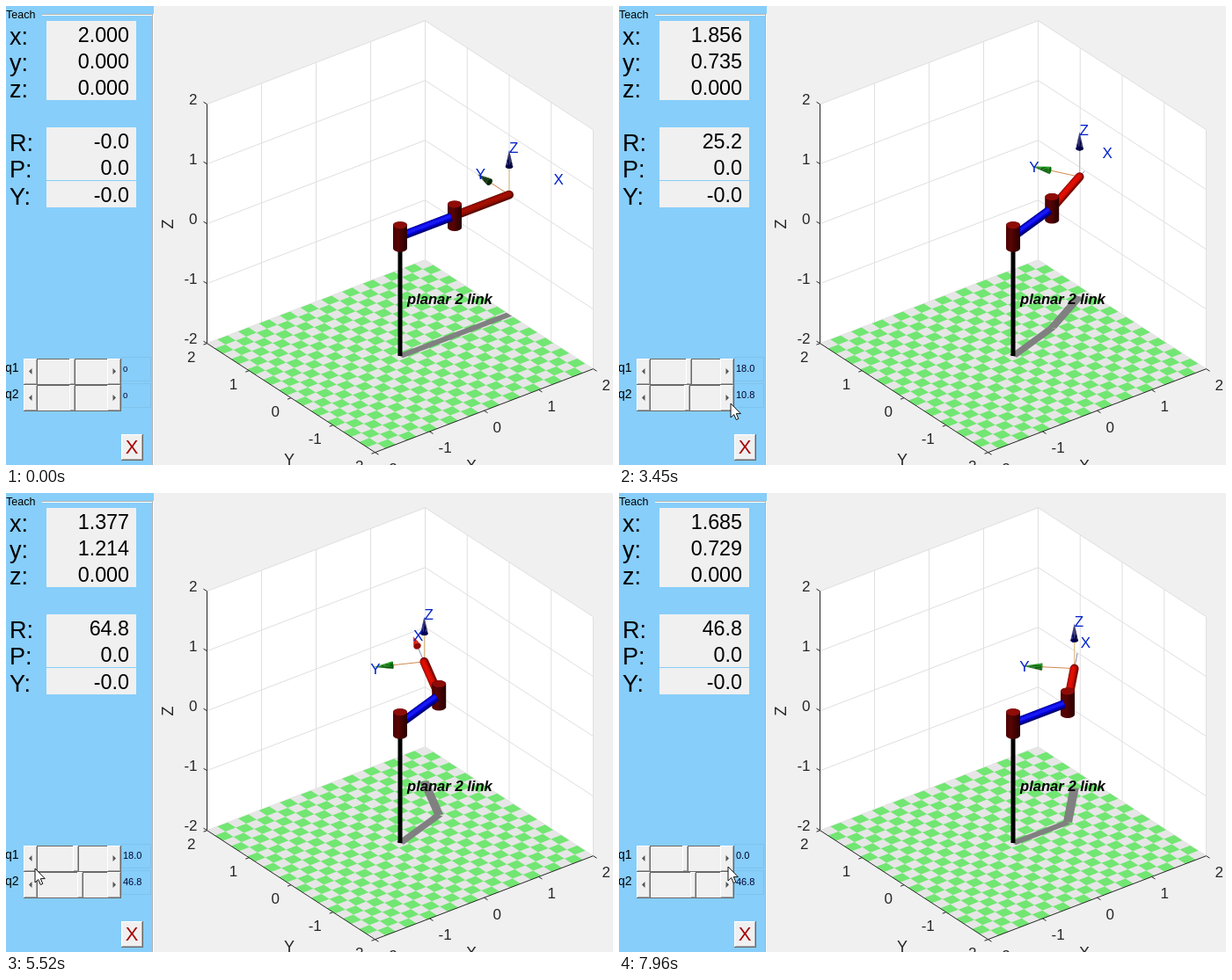
Animation, 690 px wide and 522 px high, one loop 8000 ms. Source, as an HTML page with a canvas:

```html
<!DOCTYPE html>
<html lang="en">
<head>
<meta charset="utf-8">
<title>Planar two-link arm</title>
<style>
html, body { margin: 0; width: 690px; height: 522px; overflow: hidden; background: #f0f0f0; }
canvas { display: block; }
</style>
</head>
<body>
<canvas id="stage" width="690" height="522"></canvas>
<script>
const stage = document.getElementById('stage');
const LOOP = 8000, STEP = 3.6, TEXT_LAG = 65, TILES = 21;
const FONT = '"Liberation Sans", Arial, sans-serif';
const SKY = '#87cefa', FACE = '#f0f0f0', INK = '#262626';
let c = stage.getContext('2d');

// Runs of clicks on the slider arrows
const RUNS = [
  { q: 0, dir: 1, first: 1550, every: 150, count: 5 },
  { q: 1, dir: 1, first: 3100, every: 169, count: 13 },
  { q: 0, dir: -1, first: 5800, every: 157, count: 8 },
  { q: 0, dir: 1, first: 7640, every: 120, count: 3 }
];
// Cursor moves: start, end, from x y, to x y
const MOVES = [
  [310, 890, 262, 524, 117, 420],
  [1050, 1270, 117, 420, 121, 413],
  [2320, 2960, 121, 413, 127, 452],
  [5210, 5520, 127, 452, 33, 427],
  [6980, 7310, 33, 427, 125, 427],
  [7370, 7400, 125, 427, 124, 425]
];

const clamp = (v, a, b) => Math.min(b, Math.max(a, v));
const rad = d => d * Math.PI / 180;
const add = (a, b, k = 1) => a.map((v, i) => v + b[i] * k);
const project = ([x, y, z]) =>
  [448 + 62 * x - 47.75 * y, 262.2 - 23.75 * x - 31 * y - 68 * z];

function joints(t) {
  const q = [0, 0], used = [false, false];
  for (const r of RUNS) {
    const n = clamp(Math.floor((t - r.first) / r.every) + 1, 0, r.count);
    q[r.q] += n * r.dir;
    if (n) used[r.q] = true;
  }
  return { q: q.map(n => n * STEP), used };
}

function pose([a, b]) {
  const elbow = [Math.cos(rad(a)), Math.sin(rad(a)), 0];
  const dir = [Math.cos(rad(a + b)), Math.sin(rad(a + b)), 0];
  return { elbow, dir, tip: add(elbow, dir), turn: a + b };
}

function poly(pts, fill) {
  c.beginPath();
  pts.forEach(p => c.lineTo(p[0], p[1]));
  c.closePath();
  c.fillStyle = fill;
  c.fill();
}

function line(a, b, color, width = 1, cap = 'butt') {
  c.beginPath();
  c.moveTo(a[0], a[1]);
  c.lineTo(b[0], b[1]);
  c.strokeStyle = color;
  c.lineWidth = width;
  c.lineCap = cap;
  c.stroke();
}

function text(s, x, y, size, color = '#000', align = 'left', style = '') {
  c.font = `${style} ${size}px ${FONT}`;
  c.textAlign = align;
  c.fillStyle = color;
  c.fillText(s, x, y);
}

function rect(x, y, w, h, fill) {
  c.fillStyle = fill;
  c.fillRect(x, y, w, h);
}

function raised(x, y, w, h) {
  rect(x, y, w, h, '#696969');
  rect(x, y, w - 1, h - 1, '#fff');
  rect(x + 1, y + 1, w - 2, h - 2, '#a8a8a8');
  rect(x + 1, y + 1, w - 3, h - 3, FACE);
}

function axes() {
  const at = (x, y, z) => project([x, y, z]);
  poly([at(-2, 2, 2), at(2, 2, 2), at(2, 2, -2), at(-2, 2, -2)], '#fff');
  poly([at(2, 2, 2), at(2, -2, 2), at(2, -2, -2), at(2, 2, -2)], '#fff');
  for (let i = -2; i <= 2; i++) {
    line(at(i, 2, -2), at(i, 2, 2), '#dfdfdf');
    line(at(2, i, -2), at(2, i, 2), '#dfdfdf');
    line(at(-2, 2, i), at(2, 2, i), '#dfdfdf');
    line(at(2, 2, i), at(2, -2, i), '#dfdfdf');
  }
  poly([at(-2, -2, -2), at(2, -2, -2), at(2, 2, -2), at(-2, 2, -2)], '#e6e6e6');
  const w = 4 / TILES;
  for (let i = 0; i < TILES; i++) for (let j = 0; j < TILES; j++) {
    if ((i + j) % 2 === 0) continue;
    const x = -2 + i * w, y = -2 + j * w;
    poly([at(x, y, -2), at(x + w, y, -2), at(x + w, y + w, -2), at(x, y + w, -2)], '#72e672');
  }
  line(at(-2, 2, 2), at(-2, 2, -2), INK);
  line(at(-2, 2, -2), at(-2, -2, -2), INK);
  line(at(-2, -2, -2), at(2, -2, -2), INK);
  for (let i = -2; i <= 2; i++) {
    const z = at(-2, 2, i), y = at(-2, i, -2), x = at(i, -2, -2);
    line(z, add(z, [-4, -2.5]), INK);
    line(y, add(y, [-4, 1.5]), INK);
    line(x, add(x, [4, 2.5]), INK);
    text(i, z[0] - 11, z[1] + .5, 17, INK, 'right');
    text(i, y[0] - 13, y[1] + 21, 17, INK, 'right');
    text(i, x[0] + 10, x[1] + 24.5, 17, INK);
  }
  text('Y', 322, 522, 18, INK, 'center');
  text('X', 529, 529, 18, INK, 'center');
  c.save();
  c.translate(190, 248);
  c.rotate(-Math.PI / 2);
  text('Z', 0, 0, 18, INK, 'center');
  c.restore();
}

function panel() {
  rect(0, 0, 168, 522, SKY);
  rect(41, 9, 126, 1, '#b2b2b2');
  rect(41, 10, 126, 1, '#fff');
  rect(166, 9, 1, 513, '#b2b2b2');
  rect(167, 9, 1, 513, '#fff');
  text('Teach', 0, 14, 12.5);
  rect(46, 17, 102, 90, FACE);
  rect(46, 138, 102, 91, FACE);
  rect(46, 198, 102, 1, SKY);
  [['x:', 44], ['y:', 74], ['z:', 104], ['R:', 165], ['P:', 195], ['Y:', 226]]
    .forEach(([s, y]) => text(s, 4, y, 27));
  raised(131, 487, 25, 30);
  text('X', 143, 509, 22, '#a80000', 'center');
  for (let i = 0; i < 2; i++) {
    const y = 401 + i * 30;
    text('q' + (i + 1), -1, y + 15, 14);
    c.strokeStyle = '#80c2ec';
    c.lineWidth = 1;
    c.strokeRect(131.5, y - 1.5, 33, 27);
  }
}

function backdrop() {
  const layer = document.createElement('canvas');
  layer.width = 690;
  layer.height = 522;
  const main = c;
  c = layer.getContext('2d');
  rect(0, 0, 690, 522, FACE);
  axes();
  panel();
  c = main;
  return layer;
}

function readings(t, now) {
  const p = pose(joints(t - TEXT_LAG).q);
  const turn = Math.abs(p.turn) < .05 ? '-0.0' : p.turn.toFixed(1);
  [[p.tip[0].toFixed(3), 41], [p.tip[1].toFixed(3), 71], ['0.000', 101],
   [turn, 162], ['0.0', 192], ['-0.0', 223]]
    .forEach(([s, y]) => text(s, 140, y, 23.3, '#000', 'right'));
  now.q.forEach((v, i) => {
    const y = 401 + i * 30, x = Math.round(72 + v / 360 * 73);
    rect(20, y, 111, 30, '#696969');
    rect(36, y + 1, 79, 28, FACE);
    raised(20, y, 16, 30);
    raised(115, y, 16, 30);
    raised(x, y, 7, 30);
    poly([[26, y + 14.5], [29.5, y + 11], [29.5, y + 18]], '#555');
    poly([[125, y + 14.5], [121.5, y + 11], [121.5, y + 18]], '#555');
    text(now.used[i] ? v.toFixed(1) : '0', 133, y + 15, now.used[i] ? 11 : 9.5, '#000030');
  });
}

// Flat strip on the floor under one link
function shadow(a, b) {
  const side = [a[1] - b[1], b[0] - a[0], 0];
  const corner = (p, k) => project(add([p[0], p[1], -2], side, k));
  poly([corner(a, .065), corner(b, .065), corner(b, -.065), corner(a, -.065)], '#808080');
}

function tube(a, b, shades, cap) {
  const p = project(a), q = project(b);
  const len = Math.hypot(q[0] - p[0], q[1] - p[1]) || 1;
  let n = [(q[1] - p[1]) / len, (p[0] - q[0]) / len];
  if (n[0] + n[1] > 0) n = n.map(v => -v);
  [[10, 0], [7, .9], [3.5, 1.2]].forEach(([w, k], i) =>
    line(add(p, n, k), add(q, n, k), shades[i], w, cap));
}

function cylinder(at) {
  const [x, y] = project(at);
  const g = c.createLinearGradient(x - 8, 0, x + 8, 0);
  g.addColorStop(0, '#4a0000');
  g.addColorStop(.35, '#580404');
  g.addColorStop(1, '#260000');
  c.fillStyle = g;
  c.beginPath();
  c.ellipse(x, y - 13, 8, 4, 0, Math.PI, 0);
  c.ellipse(x, y + 13.5, 8, 4, 0, 0, Math.PI);
  c.fill();
  c.beginPath();
  c.ellipse(x, y - 13, 7.8, 4, 0, 0, 7);
  c.fillStyle = '#8e0c08';
  c.fill();
}

function cone(from, axis, u, v, rgb) {
  const base = add(from, axis, .47), top = project(add(from, axis, .75));
  const ring = Array.from({ length: 13 }, (_, i) => {
    const a = i * Math.PI / 6;
    return project(add(add(base, u, .055 * Math.cos(a)), v, .055 * Math.sin(a)));
  });
  const tint = k => `rgb(${rgb.map(n => Math.round(n * k))})`;
  poly(ring, tint(.65));
  for (let i = 0; i < 12; i++) {
    const [a, b] = [ring[i], ring[i + 1]];
    const area = (a[0] - top[0]) * (b[1] - top[1]) - (a[1] - top[1]) * (b[0] - top[0]);
    if (area < 0) poly([top, a, b], tint(.75 + .25 * Math.cos(i * Math.PI / 6 - 1)));
  }
}

function toolFrame({ tip, dir, turn }) {
  const side = [-dir[1], dir[0], 0], up = [0, 0, 1];
  const p = project(tip);
  const stem = (axis, k, color) => line(p, project(add(tip, axis, k)), color);
  stem(up, .47, '#dcb878');
  stem(side, .5, '#d08a50');
  if (turn > 20) stem(dir, clamp((turn - 18) / 60, .08, .45), '#8088b8');
  cone(tip, up, dir, side, [0, 0, 120]);
  cone(tip, side, up, dir, [0, 60 + clamp(turn, 0, 18) * 6, 0]);
  if (turn > 50) cone(tip, dir, side, up, [225, 10, 0]);
  [['X', dir], ['Y', side], ['Z', up]].forEach(([s, axis]) => {
    const [x, y] = project(add(tip, axis, .8));
    text(s, x + (s === 'X' ? 1 : 0), y + 7, 17, '#0022cc');
  });
}

function arm(p) {
  const origin = [0, 0, 0];
  shadow(origin, p.elbow);
  shadow(p.elbow, p.tip);
  line([448, 276], [448, 398], '#000', 5);
  toolFrame(p);
  const r = 165 + clamp(p.turn, 0, 18) * 3.4;
  const red = [.55, .87, 1].map(k => `rgb(${Math.round(r * k)},${Math.round(14 * k)},0)`);
  tube(p.elbow, p.tip, red, 'round');
  cylinder(p.elbow);
  tube(origin, add(origin, p.elbow, .94), ['#000078', '#0000d2', '#1818f4'], 'butt');
  cylinder(origin);
  text('planar 2 link', 456, 339, 16.6, '#000', 'left', 'italic bold');
}

function pointer(t) {
  if (t < MOVES[0][0]) return;
  const [start, end, x0, y0, x1, y1] = MOVES.filter(m => t >= m[0]).pop();
  const k = clamp((t - start) / (end - start), 0, 1), e = k * k * (3 - 2 * k);
  const x = x0 + (x1 - x0) * e, y = y0 + (y1 - y0) * e;
  const pressed = RUNS.some(r => {
    const n = Math.floor((t - r.first + 85) / r.every);
    return n >= 0 && n < r.count && t < r.first + n * r.every;
  });
  if (pressed) {
    c.beginPath();
    c.arc(x - .5, y + .5, 15, 0, 7);
    c.fillStyle = 'rgba(245,240,50,.72)';
    c.fill();
  }
  const shape = [[0, 0], [0, 16], [3.7, 12.6], [6.3, 18.5], [8.8, 17.4], [6.3, 11.6], [11.3, 11.6]]
    .map(p => add(p, [x, y]));
  poly(shape, '#fff');
  c.strokeStyle = '#111';
  c.lineWidth = 1;
  c.stroke();
}

const back = backdrop();

function draw(ms) {
  const t = ms % LOOP, now = joints(t);
  c.drawImage(back, 0, 0);
  readings(t, now);
  arm(pose(now.q));
  pointer(t);
}

const begin = performance.now();
function tick() {
  draw(performance.now() - begin);
  requestAnimationFrame(tick);
}
tick();
</script>
</body>
</html>
```
